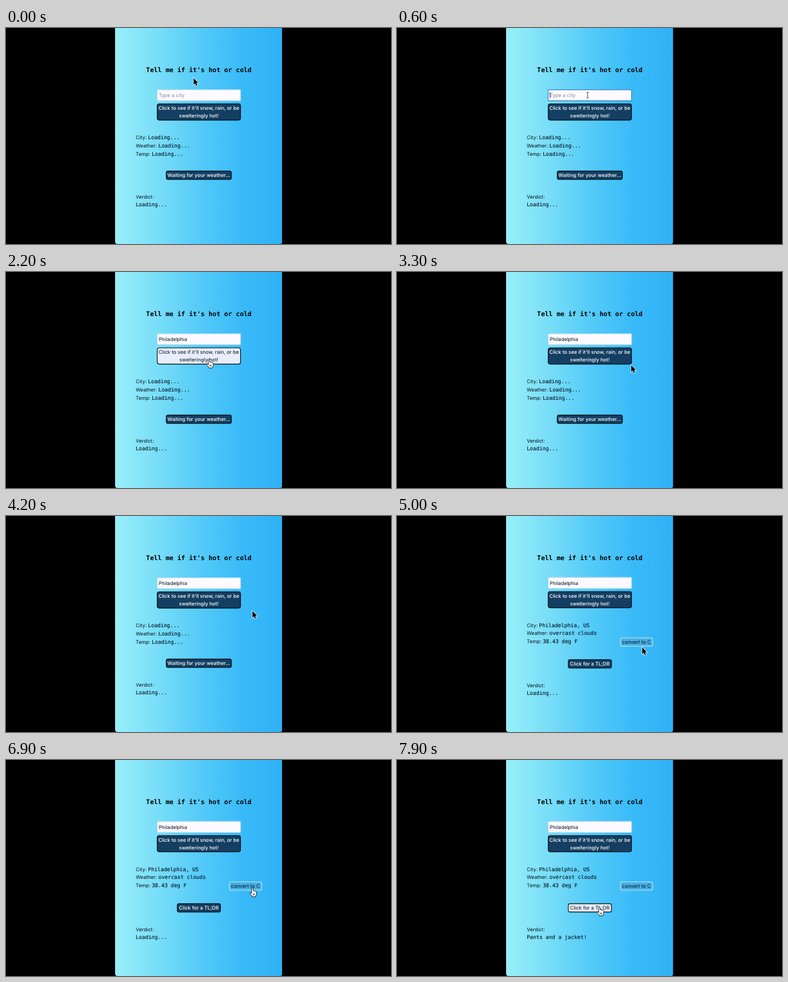
An HTML page that plays this animation: 600x338 px, repeating every 8000 ms.

```html
<!DOCTYPE html>
<html lang="en">
<head>
<meta charset="utf-8">
<title>Hot or cold</title>
<style>
html, body { margin: 0; width: 100%; height: 100%; overflow: hidden; background: #000; }
svg { display: block; width: 600px; height: 338px; }
text { font: 7.75px Inter, sans-serif; fill: #04121d; text-rendering: geometricPrecision; }
.mono { font: 8.2px "DejaVu Sans Mono", monospace; stroke: #04121d; stroke-width: .1; }
.title { font: bold 10.12px "DejaVu Sans Mono", monospace; fill: #000; }
.mid { text-anchor: middle; }
.button rect { fill: #143f62; stroke: #04101b; stroke-width: 1.1; }
.button text { fill: #fff; font-weight: 500; }
.button.hover rect { fill: #e9edf9; }
.button.hover text { fill: #04121d; font-weight: 400; }
#field { fill: #fcfaff; stroke: #b4d9ef; stroke-width: 1.2; }
#field.focus { stroke: #3f83c8; }
#typed.hint { fill: #858b96; }
</style>
</head>
<body>
<svg viewBox="0 0 600 338">
  <defs>
    <linearGradient id="sky">
      <stop offset="0" stop-color="#98eff9"/>
      <stop offset=".25" stop-color="#79def8"/>
      <stop offset=".5" stop-color="#55cbf8"/>
      <stop offset=".75" stop-color="#3abbf8"/>
      <stop offset="1" stop-color="#2fb1f7"/>
    </linearGradient>
  </defs>
  <rect width="600" height="338"/>
  <path d="M170 0H430.2V335Q430.2 338 427.2 338H174Q170 338 170 334Z" fill="url(#sky)"/>

  <g id="upper">
    <text class="title mid" x="300.5" y="69">Tell me if it's hot or cold</text>
    <rect id="field" x="235.6" y="96.6" width="130" height="17.2" rx="1"/>
    <text id="typed" x="238" y="108"></text>
    <path id="caret" d="M0 100.5V109.5" stroke="#000" stroke-width=".8"/>
    <g class="button" id="search">
      <rect x="235.7" y="118.7" width="129.8" height="25.4" rx="3"/>
      <text class="mid" x="300.5" y="128.4">Click to see if it'll snow, rain, or be</text>
      <text class="mid" x="300.5" y="140.2">swelteringly hot!</text>
    </g>
    <text x="202.3" y="174.1">City: <tspan class="mono" id="city"></tspan></text>
    <text x="202.3" y="186.8">Weather: <tspan class="mono" id="weather"></tspan></text>
    <text x="202.3" y="199.6">Temp: <tspan class="mono" id="temp"></tspan></text>
  </g>

  <g class="button" id="waiting">
    <rect x="249.8" y="223.9" width="101.4" height="13" rx="2.5"/>
    <text class="mid" x="300.5" y="233.2">Waiting for your weather...</text>
  </g>
  <g class="button" id="summary">
    <rect x="267" y="224.9" width="67.2" height="13" rx="2.5"/>
    <text class="mid" x="300.5" y="234.2">Click for a TL;DR</text>
  </g>
  <g id="convert">
    <rect x="348.3" y="190.7" width="50.2" height="13" rx="2.5" fill="#47b0e6" stroke="#c5e2f4" stroke-width="1.1"/>
    <text class="mid" x="373.3" y="200">convert to C</text>
  </g>
  <g id="lower">
    <text x="202.3" y="266.9">Verdict:</text>
    <text class="mono" id="verdict" x="202.2" y="279"></text>
  </g>

  <g id="pointer">
    <path id="arrow" d="M-.2 -.2V9.9L2.1 7.9L3.8 11.6L5.4 10.9L3.9 7.3H7Z" stroke="#dceffa" stroke-width="1.6" paint-order="stroke"/>
    <path id="hand" transform="translate(0 -.6) scale(1.17)" d="M-1 1.2Q0 0 1 1.2L1.3 4.6Q2.3 4 2.9 4.9Q4 4.4 4.5 5.4Q5.8 5.1 6 6.4L5.6 9.5L4.6 11.5V12.5H-.2V11.6L-3.2 8.4Q-4 7 -2.7 6.8L-.9 8.1ZM1.2 8.2V10.6M2.8 8.2V10.6" fill="#fff" stroke="#000" stroke-width=".7" stroke-linejoin="round"/>
    <path id="beam" d="M-1.5 -4.5Q0 -4.5 0 -3.5Q0 -4.5 1.5 -4.5M0 -3.5V3.5M-1.5 4.5Q0 4.5 0 3.5Q0 4.5 1.5 4.5" fill="none" stroke="#222" stroke-width=".8"/>
  </g>
</svg>
<script>
const LOOP = 8000, STEP = 100;
const CITY = "Philadelphia";
const FOCUS = 500, TYPE_START = 700, TYPE_END = 1800, SUBMIT = 2200, LOADED = 4500, VERDICT = 7800;

// [time, x, y] of the pointer's hot spot
const PATH = [
  [0, 292.6, 78.8], [100, 292.6, 78.8], [400, 297, 105], [1800, 297, 105],
  [2200, 316.3, 136.2], [2800, 316.3, 136.2], [3600, 388, 151], [3900, 388, 151],
  [4200, 384.3, 149], [4500, 384, 158], [5000, 382.5, 206], [5300, 390, 199],
  [5700, 397, 198], [5900, 397, 198], [6100, 393, 199], [6300, 395, 199],
  [6700, 383.8, 200], [6900, 383.8, 200], [7600, 315.4, 229.8], [8000, 315.4, 229.8]
];

const el = {};
document.querySelectorAll("svg [id]").forEach(node => el[node.id] = node);
const show = (node, on) => { node.style.display = on ? "" : "none"; };
const setText = (node, text) => { if (node.textContent !== text) node.textContent = text; };
const inside = ([x, y], left, top, right, bottom) => x >= left && x <= right && y >= top && y <= bottom;

function pointerAt(t) {
  const i = PATH.findIndex(p => p[0] > t);
  const [t0, x0, y0] = PATH[i - 1], [t1, x1, y1] = PATH[i];
  const u = (t - t0) / (t1 - t0), k = u * u * (3 - 2 * u);
  return [x0 + (x1 - x0) * k, y0 + (y1 - y0) * k];
}

function render(t) {
  const loaded = t >= LOADED;
  const focused = t >= FOCUS && t < SUBMIT;
  const typing = t >= TYPE_START && t <= TYPE_END;
  const count = Math.max(0, Math.min(CITY.length, Math.floor((t - TYPE_START) / STEP) + 1));
  const pos = pointerAt(t);

  setText(el.typed, count ? CITY.slice(0, count) : "Type a city");
  el.typed.classList.toggle("hint", !count);
  el.field.classList.toggle("focus", focused);
  show(el.caret, focused);
  const caretX = 238.5 + (count ? el.typed.getComputedTextLength() : 0);
  el.caret.setAttribute("transform", `translate(${caretX} 0)`);

  setText(el.city, loaded ? "Philadelphia, US" : "Loading...");
  setText(el.weather, loaded ? "overcast clouds" : "Loading...");
  setText(el.temp, loaded ? "38.43 deg F" : "Loading...");
  setText(el.verdict, t >= VERDICT ? "Pants and a jacket!" : "Loading...");
  el.upper.setAttribute("transform", `translate(0 ${loaded ? -.5 : 0})`);
  el.lower.setAttribute("transform", `translate(0 ${loaded ? .8 : 0})`);
  show(el.waiting, !loaded);
  show(el.summary, loaded);
  show(el.convert, loaded);

  const onSearch = inside(pos, 235, 118, 366, 145);
  const onSummary = loaded && inside(pos, 266, 224, 335, 239);
  const onConvert = loaded && inside(pos, 348, 190, 399, 204);
  const onField = inside(pos, 235, 96, 366, 114);
  const onButton = onSearch || onSummary || onConvert;
  el.search.classList.toggle("hover", onSearch);
  el.summary.classList.toggle("hover", onSummary);

  show(el.pointer, !typing);
  show(el.hand, onButton);
  show(el.beam, onField);
  show(el.arrow, !onButton && !onField);
  el.pointer.setAttribute("transform", `translate(${pos})`);
}

let start;
function tick(now) {
  start ??= now;
  render(Math.floor((now - start) % LOOP / STEP) * STEP);
  requestAnimationFrame(tick);
}
render(0);
requestAnimationFrame(tick);
</script>
</body>
</html>
```
